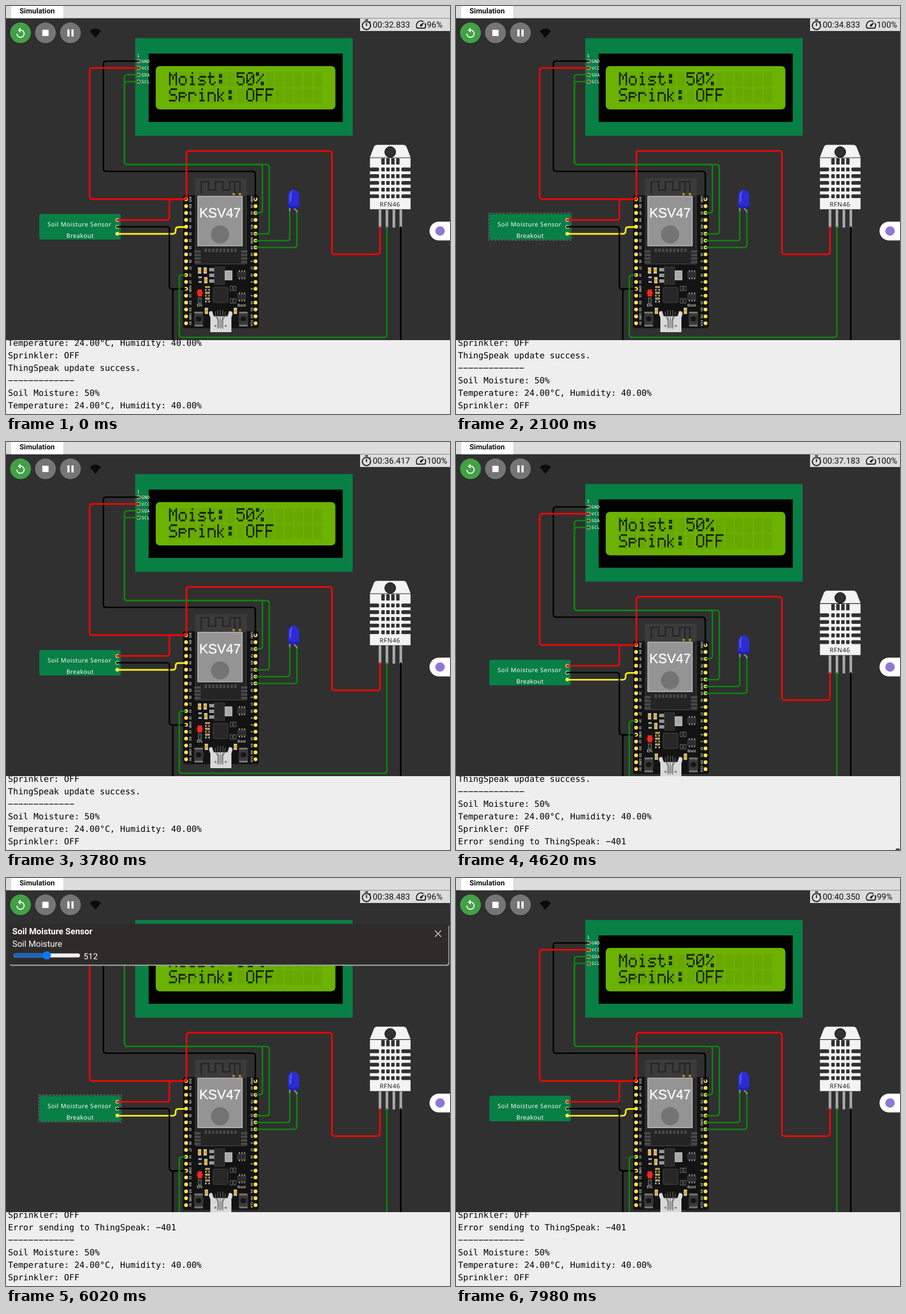
Recreate the animation shown at these times as an HTML page. Size 780 px wide and 718 px high, loop 8000 ms.

```html
<!DOCTYPE html>
<html lang="en">
<head>
<meta charset="utf-8">
<title>Simulation</title>
<style>
html, body { margin: 0; width: 100%; height: 100%; overflow: hidden; background: #303030; }
svg { display: block; font-family: Roboto, sans-serif; text-rendering: geometricPrecision; }
.mono { font-family: "DejaVu Sans Mono", monospace; }
.noto { font-family: "Noto Sans", sans-serif; }
.arial { font-family: "Liberation Sans", sans-serif; }
</style>
</head>
<body>
<svg id="stage" width="780" height="718" viewBox="0 0 780 718"></svg>
<script>
const LOOP = 8000;
const rect = (x, y, w, h, fill, more = '') =>
  `<rect x="${x}" y="${y}" width="${w}" height="${h}" fill="${fill}" ${more}/>`;
const circle = (x, y, r, fill, more = '') =>
  `<circle cx="${x}" cy="${y}" r="${r}" fill="${fill}" ${more}/>`;
const path = (d, fill, more = '') => `<path d="${d}" fill="${fill}" ${more}/>`;
const line = (d, color, width, more = '') =>
  path(d, 'none', `stroke="${color}" stroke-width="${width}" ${more}`);
const text = (x, y, size, fill, str, more = '') =>
  `<text x="${x}" y="${y}" font-size="${size}" fill="${fill}" ${more}>${str}</text>`;
const repeat = (n, f) => Array.from({ length: n }, (_, i) => f(i)).join('');
// Icon drawn on a 24 unit grid
const icon = (x, y, scale, fill, d) => path(d, fill, `transform="translate(${x} ${y}) scale(${scale})"`);

// Polyline with rounded corners
function wire(color, points, width = 2.6) {
  const p = points.split(' ').map(s => s.split(',').map(Number));
  const toward = (a, b) => {
    const len = Math.hypot(b[0] - a[0], b[1] - a[1]), k = Math.min(5, len / 2) / len;
    return [a[0] + (b[0] - a[0]) * k, a[1] + (b[1] - a[1]) * k];
  };
  let d = 'M' + p[0];
  for (let i = 1; i < p.length - 1; i++)
    d += `L${toward(p[i], p[i - 1])}Q${p[i]} ${toward(p[i], p[i + 1])}`;
  return line(d + 'L' + p.at(-1), color, width, 'stroke-linecap="round"');
}

// Dot matrix letters: strokes over a 5 x 7 grid, each point is column and row
const GLYPHS = {
  M: '06 00 22 40 46,22 23', o: '12 32 43 45 36 16 05 03 12', i: '20 20,12 22 26,16 36',
  s: '42 12 03 14 34 45 36 06', t: '10 15 26 36 45,02 32', ':': '11 21 22 12 11,14 24 25 15 14',
  5: '40 00 02 32 43 45 36 16 05', 0: '10 30 41 45 36 16 05 01 10,05 41',
  '%': '00 10 11 01 00,41 05,35 45 46 36 35', S: '40 10 01 02 13 33 44 45 36 06',
  p: '06 02 32 43 34 04', r: '02 06,03 12 32 43', n: '02 06,03 12 32 43 46',
  k: '00 06,32 14 36', O: '10 30 41 45 36 16 05 01 10', F: '40 00 06,03 33'
};
function lcdText(str, row) {
  let out = '';
  [...str].forEach((ch, n) => {
    const dots = new Set();
    for (const stroke of (GLYPHS[ch] || '').split(',').filter(Boolean)) {
      const p = stroke.split(' ').map(s => [+s[0], +s[1]]);
      for (let i = 1; i < p.length; i++) {
        const [a, b] = [p[i - 1], p[i]], dx = b[0] - a[0], dy = b[1] - a[1];
        const steps = Math.max(Math.abs(dx), Math.abs(dy), 1);
        for (let s = 0; s <= steps; s++)
          dots.add([Math.round(a[0] + dx * s / steps), Math.round(a[1] + dy * s / steps)].join());
      }
    }
    for (const dot of dots) {
      const [c, r] = dot.split(',');
      out += `M${(12.45 + n * 3.55 + c * .6).toFixed(2)} ${(12.55 + row * 5.95 + r * .7).toFixed(2)}h.55v.65h-.55z`;
    }
  });
  return path(out, '#111a00');
}

const lcd = () => `<g transform="translate(227 56.5) scale(4.775)">` +
  rect(0, 0, 80, 36, '#087f45') + rect(4.95, 5.7, 71.4, 25.2, '#000') +
  rect(7.55, 10.3, 66.1, 16, '#6cb201', 'rx="1.5"') +
  repeat(32, i => rect(12.45 + i % 16 * 3.55, 12.55 + (i >> 4) * 5.95, 2.95, 5.55, '#000', 'fill-opacity=".05"')) +
  lcdText('Moist: 50%', 0) + lcdText('Sprink: OFF', 1) + '</g>' +
  text(230, 90, 7.5, '#fff', '1', 'class="mono"') +
  ['GND', 'VCC', 'SDA', 'SCL'].map((s, i) =>
    circle(233, 97 + i * 12.1, 3, '#4d3a2a', 'stroke="#c09c80" stroke-width="1.5"') +
    text(238, 99.6 + i * 12.1, 7.6, '#fff', s, 'class="mono" letter-spacing=".4"')).join('');

const pinLabels = (names, x) => names.split(' ').map((s, i) =>
  text(0, 0, 5.4, '#ddd', s, `class="arial" font-weight="bold" text-anchor="middle" transform="translate(${x} ${340 + i * 12.13}) rotate(90)"`)).join('');

const capV = (x, y, c = '#dba92c') => rect(x, y, 6, 11, '#c4c4c4') + rect(x, y + 2.5, 6, 6, c);
const chip = (x, y, w, h) => repeat(3, i =>
  rect(x + 2 + i * (w - 5) / 2, y - 3, 2, h + 6, '#999')) + rect(x, y, w, h, '#2d2d2d', 'stroke="#555" stroke-width=".7"');
const key = x => rect(x, 538, 15, 26, '#777') + rect(x, 541, 15, 20, '#3b3b3b') +
  rect(x - 1, 546, 17, 9, '#333') + circle(x + 7.5, 550.5, 4.5, '#151515');

const board = () =>
  rect(311, 333, 133, 234, '#131313', 'rx="4"') +
  rect(333, 304, 89, 150, '#242424', 'stroke="#4b4b4b" stroke-width="1"') +
  rect(333.5, 304.5, 88, 30, '#3b3b3b') +
  line('M343 330V309H356V324H368V309H381V324H393V309H411V332M402 332V309', '#262626', 2.6) +
  rect(398, 329, 4, 4, '#b8901c') + rect(409, 329, 4, 4, '#b8901c') +
  rect(337, 335, 78, 87, '#949494', 'stroke="#bababa" stroke-width="1.6"') +
  text(376, 372, 23.5, '#fff', 'KSV47', 'class="arial" text-anchor="middle" stroke="#fff" stroke-width=".3"') +
  circle(376, 402, 16, '#747474') +
  repeat(9, i => rect(349 + i * 6.5, 427, 4, 6, '#4a4a4a')) +
  repeat(8, i => rect(i % 2 ? 413 : 331, 430 + (i >> 1) * 6.2, 11, 4, '#4a4a4a')) +
  repeat(38, i => {
    const x = i % 2 ? 438.4 : 316.4, y = 340 + (i >> 1) * 12.13;
    return circle(x, y, 4.4, '#000') + circle(x, y, 3.4, '#ffdf5c');
  }) +
  pinLabels('3V3 EN VP VN 34 35 32 33 25 26 27 14 12 GND 13 D2 D3 CMD 5V', 322) +
  pinLabels('GND 23 22 TX RX 21 GND 19 18 5 17 16 4 0 2 15 D1 D0 CLK', 430) +
  capV(337, 460) + capV(347, 460) + capV(338, 476, '#222') + capV(348, 477) +
  rect(357, 461, 11, 6, '#999') + rect(357, 471, 11, 6, '#999') + rect(357, 481, 11, 6, '#999') +
  rect(366, 459, 18, 31, '#292929', 'stroke="#444" stroke-width=".8"') +
  rect(385, 466, 12, 16, '#aaa', 'stroke="#ddd" stroke-width="1"') +
  chip(407, 468, 14, 10) + chip(407, 507, 14, 10) +
  rect(364, 495, 26, 27, '#272727', 'rx="2" stroke="#444" stroke-width="1"') +
  repeat(6, i => rect(350, 493 + i * 5.1, 8, 3.2, i % 3 ? '#c7c7c7' : '#e1b640') + rect(352, 493 + i * 5.1, 4, 3.2, i % 2 ? '#222' : '#b28f36')) +
  repeat(4, i => rect(394 + i % 2 * 6, 493 + (i >> 1) * 22, 4, 8, '#111', 'stroke="#888" stroke-width=".8"')) +
  circle(340.5, 505, 8, '#f00', 'fill-opacity=".22"') + rect(337, 499, 7, 12, '#a05048') +
  circle(340.5, 505, 4.8, '#f5281c') +
  rect(338, 514, 5, 9, '#222', 'stroke="#888" stroke-width="1"') +
  text(340, 529, 7, '#fff', 'EN', 'class="arial" text-anchor="middle"') +
  text(414, 529, 7, '#fff', 'Boot', 'class="arial" text-anchor="middle"') +
  capV(349, 531) + capV(400, 531) + key(331) + key(409.5) +
  path('M359 574V548Q353 536 362 537L365 546H389L392 537Q401 536 396 548V574Z', '#d9d9d9') +
  line('M368 538V545L372 552V568M372 535V549L374 553V566M376.5 535V568M381 535V549L379 553V566M385 538V545L381 552V568', '#666', 1.2) +
  circle(368, 563, 1.8, '#777') + circle(386, 563, 1.8, '#777');

const sensor = () =>
  rect(58.5, 366, 143, 45, '#087f45', 'rx="3"') +
  `<rect id="pick" x="57.5" y="364.5" width="145" height="47.5" fill="none" stroke="#5d6b62" stroke-width="1.4" stroke-dasharray="4 2"/>` +
  ['#f00', '#000', '#ff0'].map((c, i) => circle(195.5, 376.5 + i * 12.1, 2.7, c, 'stroke="#e8d9a0" stroke-width="1.2"')).join('') +
  text(73, 388, 10.5, '#fff', 'Soil Moisture Sensor', 'class="noto" letter-spacing=".58"') +
  text(106, 407.5, 10.5, '#fff', 'Breakout', 'class="noto" letter-spacing=".4"');

const led = () =>
  line('M498.5 352V362M507 352V357L511 361V364', '#8a8a8a', 2.6) +
  path('M495.5 350V333A9.8 11 0 0 1 515 333V350L516 353Q506 359 495 354Z', '#2c2cd6') +
  path('M495 349Q505 355 516 349V353Q506 359 495 354Z', '#2222b4') +
  path('M498 345V333Q499 327 503 325Q501 332 501 345Z', '#5353e6');

const weather = () =>
  repeat(4, i => rect(654.7 + i * 12.2, 357, 4.6, 33, '#a9a9a9')) +
  path('M639 266L646 248Q648 244 652 244H698Q702 244 704 248L711 266V358H639Z', '#f3f3f3', 'stroke="#222" stroke-width=".6"') +
  line('M639 267H711', '#222', 1.2) + circle(675, 257, 9.5, '#303030', 'stroke="#000" stroke-width="1"') +
  repeat(10, i => rect(i % 2 ? 694.5 : 638.5, 284.3 + (i >> 1) * 11.8, 17, 6.6, '#303030', 'rx="2.5"')) +
  repeat(24, i => rect(659.3 + i % 4 * 8.7, i < 4 ? 268 : 272.5 + (i >> 2) * 11.8, 6, i < 4 ? 11 : 6.8, '#303030', 'rx="1"')) +
  text(674.5, 353, 11, '#222', 'RFN46', 'class="noto" text-anchor="middle" letter-spacing=".5"');

const RED = '#ee0606', GREEN = '#0b860f', BLACK = '#000';
const wires = () =>
  wire(BLACK, '230,97 171,97 171,291 438,291 438,340') +
  wire(RED, '231,109 147,109 147,340 316,340', 3) +
  wire(RED, '196,376.5 287,376.5 287,340 316,340', 2.8) +
  wire(RED, '317,340 317,255 572.5,255 572.5,437 657,437 657,389', 3) +
  wire(GREEN, '232,121 208,121 208,279 462.5,279 462.5,401 438,401') +
  wire(GREEN, '232,133 208,133 208,279 450.5,279 450.5,364 438,364') +
  wire('#ffee1a', '196,401 298,401 298,389 316,389', 2.8) +
  wire(BLACK, '196,388.5 287,388.5 287,498 316,498') +
  wire(BLACK, '316,498 293,498 293,600') +
  wire(GREEN, '438,413 498.5,413 498.5,362') +
  wire(GREEN, '438,425 511,425 511,364') +
  wire(GREEN, '316,473.5 304.5,473.5 304.5,583 669,583 669,389') +
  wire(BLACK, '693.5,389 693.5,610');

const roundButton = (x, fill) => circle(x, 48.5, 18.5, '#000', 'opacity=".3"') + circle(x, 47.3, 18.3, fill);
const toolbar = () =>
  roundButton(25.5, '#43a047') + roundButton(69.3, '#757575') + roundButton(113.2, '#757575') +
  icon(14.7, 37, .9, '#fff', 'M12 5V1L7 6l5 5V7c3.31 0 6 2.69 6 6s-2.69 6-6 6-6-2.69-6-6H4c0 4.42 3.58 8 8 8s8-3.58 8-8-3.58-8-8-8z') +
  rect(63.8, 41.8, 11, 11, '#fff') + rect(107.8, 41, 3.8, 12.6, '#fff') + rect(115, 41, 3.8, 12.6, '#fff') +
  path('M147 44Q157 35.5 167 44L157 56Z', '#0b0b0b');

const status = () =>
  rect(622, 22, 158, 22, '#dcdcdc') +
  icon(622.5, 22.6, .9, '#111', 'M15 1H9v2h6zM11 14h2V8h-2zM19.03 7.39l1.42-1.42c-.43-.51-.9-.99-1.41-1.41l-1.42 1.42A9 9 0 1 0 19.03 7.39zM12 20a7 7 0 1 1 0-14 7 7 0 0 1 0 14z') +
  icon(718.2, 21.8, .9, '#111', 'M20.38 8.57l-1.23 1.85a8 8 0 0 1-.22 7.58H5.07A8 8 0 0 1 15.58 6.85l1.85-1.23A10 10 0 0 0 3.35 19a2 2 0 0 0 1.72 1h13.85a2 2 0 0 0 1.74-1 10 10 0 0 0-.27-10.44zM10.59 15.41a2 2 0 0 0 2.83 0l5.66-8.49-8.49 5.66a2 2 0 0 0 0 2.83z') +
  text(644.2, 38.3, 14.8, '#111', '', 'id="clock"') + text(739.3, 38.3, 14.8, '#111', '', 'id="speed"');

const panel = () => '<g id="panel">' +
  rect(6, 83, 772.5, 71.5, '#aaa', 'rx="4"') + rect(4.5, 80.5, 772.5, 72, '#2d2c2b', 'rx="4"') +
  text(11, 99.3, 15, '#fff', 'Soil Moisture Sensor', 'font-weight="700"') +
  text(11, 121.2, 15, '#fff', 'Soil Moisture') +
  line('M753.5 92.5L764.5 103.5M764.5 92.5L753.5 103.5', '#ccc', 1.5) +
  rect(13, 132.8, 117, 7, '#efefef', 'rx="3.5"') +
  rect(13, 132.8, 60, 7, '', 'rx="3.5" id="fill"') + circle(72, 136.3, 7.2, '', 'id="thumb"') +
  text(136.3, 143.3, 14.8, '#fff', '', 'id="value"') + '</g>';

const $ = id => document.getElementById(id);
$('stage').innerHTML =
  rect(0, 0, 780, 718, '#303030') +
  `<g id="circuit">${lcd()}${board()}${sensor()}${led()}${weather()}${wires()}</g>` +
  rect(0, 0, 780, 21.5, '#dcdcdc') + rect(9, 0, 91.5, 21.5, '#fff') +
  text(54.7, 13, 12.8, '#111', 'Simulation', 'font-weight="700" text-anchor="middle"') +
  toolbar() + status() + panel() +
  rect(744, 379.5, 60, 33, '#fff', 'rx="16.5"') + circle(762.5, 396, 8.3, '#8f79d6') +
  `<clipPath id="log"><rect y="588" width="780" height="130"/></clipPath>` +
  rect(0, 588, 780, 130, '#eee') +
  `<g clip-path="url(#log)">${repeat(6, i => text(3.5, 598.3 + i * 22, 14.88, '#000', '', `class="mono" id="row${i}"`))}</g>` +
  circle(776, 719, 4, '#444', 'id="corner"');

const TEMP = 'Temperature: 24.00°C, Humidity: 40.00%', OFF = 'Sprinkler: OFF';
const SOIL = 'Soil Moisture: 50%', RULE = '−'.repeat(13);
const LOG = [
  [0, TEMP], [0, OFF], [0, 'ThingSpeak update success.'], [0, RULE], [0, SOIL], [0, TEMP],
  [560, OFF], [4550, 'Error sending to ThingSpeak: −401'], [4690, RULE],
  [5460, SOIL], [5600, TEMP], [5740, OFF]
];
const CLOCK = [[0, 32.833], [2100, 34.833], [3780, 36.417], [4620, 37.183], [6020, 38.483], [7140, 39.567], [7980, 40.35], [8050, 40.417]];
const SPEED = [[0, 96], [420, 98], [910, 100], [2520, 97], [3080, 99], [3640, 100], [5180, 98], [5810, 96], [6440, 98], [7000, 100], [7770, 99]];

const within = (t, a, b) => t >= a && t < b;
const ease = (t, a, b) => {
  const k = Math.min(1, Math.max(0, (t - a) / (b - a)));
  return k * k * (3 - 2 * k);
};
const show = (id, on) => $(id).setAttribute('visibility', on ? 'visible' : 'hidden');

function draw(t) {
  const i = CLOCK.findLastIndex(k => k[0] <= t), [t0, a] = CLOCK[i], [t1, b] = CLOCK[i + 1];
  const sec = Math.round((a + (b - a) * (t - t0) / (t1 - t0)) * 60) / 60;
  $('clock').textContent = '00:' + sec.toFixed(3);
  $('speed').textContent = SPEED.findLast(k => k[0] <= t)[1] + '%';

  $('circuit').setAttribute('transform', `translate(0 ${17.3 * ease(t, 4000, 4250)})`);
  show('pick', within(t, 1750, 3710) || within(t, 5400, 7490));
  show('panel', within(t, 2240, 3710) || within(t, 5670, 7490));
  show('corner', within(t, 700, 1400) || within(t, 4480, 5110));

  const second = t > 5000;
  const value = Math.round(512 + (second ? 258 * ease(t, 6250, 6900) : 190 * ease(t, 2850, 3450)));
  const x = 20.2 + value / 1023 * 102.6;
  const held = second ? t >= 7070 : t >= 3500;
  $('fill').setAttribute('width', x - 13);
  $('fill').setAttribute('fill', held ? '#3a8df0' : '#1763c4');
  $('thumb').setAttribute('cx', x);
  $('thumb').setAttribute('fill', held ? '#0d60c2' : '#0a79f5');
  $('value').textContent = value;

  LOG.filter(l => l[0] <= t).slice(-6).forEach((l, n) => $('row' + n).textContent = l[1]);
}

function frame() {
  draw(performance.now() % LOOP);
  requestAnimationFrame(frame);
}
frame();
</script>
</body>
</html>
```
